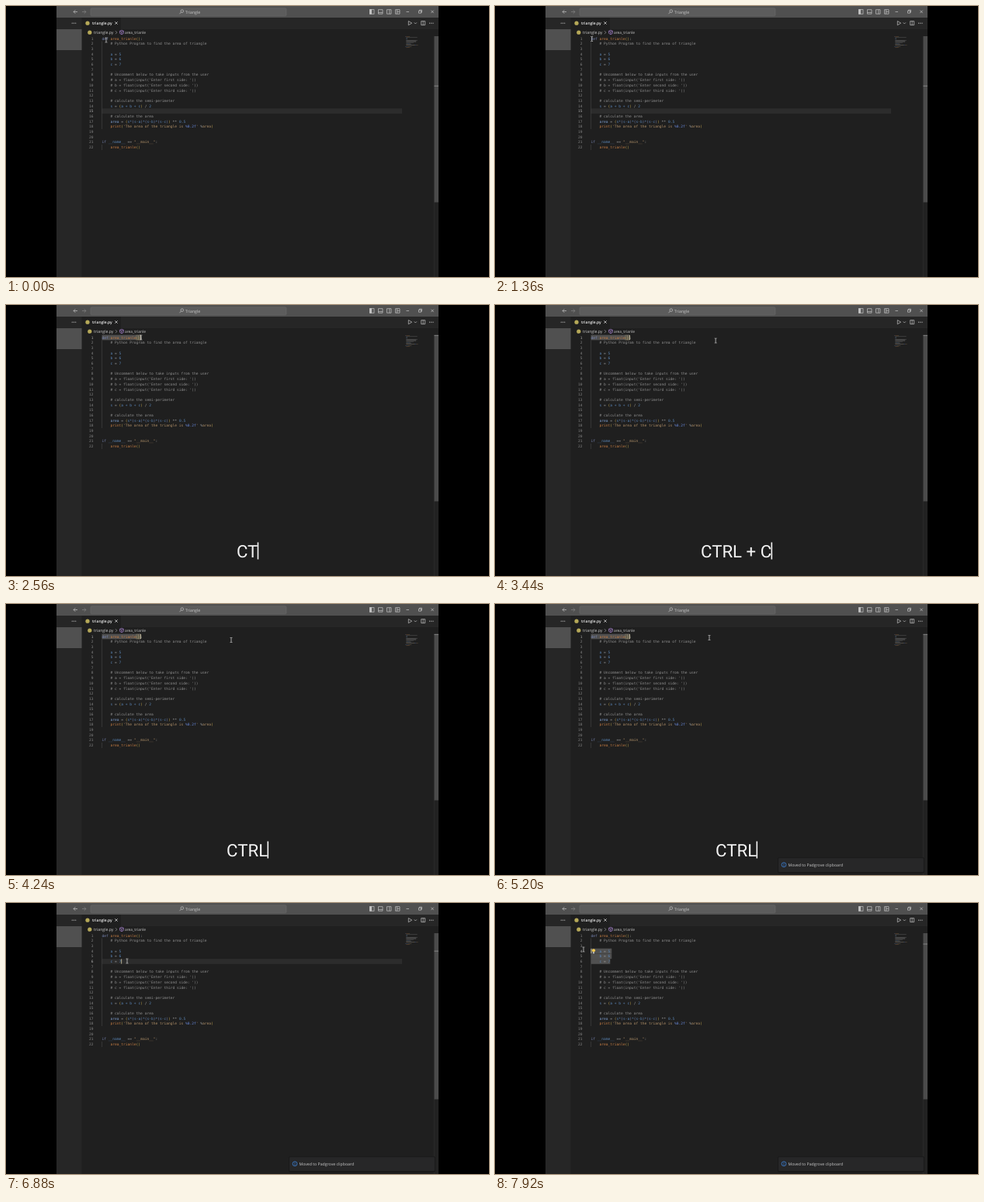
An HTML page for the animation above (8000 ms loop, 622 by 350 pixels).

```html
<!DOCTYPE html>
<html lang="en">
<head>
<meta charset="utf-8">
<title>Editor</title>
<style>
  html, body { margin: 0; width: 100%; height: 100%; overflow: hidden; background: #000; }
  svg { display: block; width: 622px; height: 350px; }
  text { white-space: pre; text-rendering: geometricPrecision; }
  .code { font: 4.585px "DejaVu Sans Mono", monospace; }
  .ui { font: 5.2px "Open Sans", "Noto Sans", sans-serif; fill: #c8c8c8; }
  .keys { font: 22.2px Roboto, sans-serif; fill: #f4f4f4; }
  .icon { fill: none; stroke: #c4c4c4; stroke-width: .7; }
</style>
</head>
<body>
<svg id="stage" viewBox="0 0 622 350">
  <rect width="622" height="350" fill="#000"/>
  <rect x="65" width="492" height="350" fill="#1f1f1f"/>
  <rect x="65" y="15" width="492" height="15" fill="#262626"/>
  <rect x="65" y="15" width="32.5" height="335" fill="#262626"/>
  <rect x="65" y="30" width="32.5" height="27" fill="#505050"/>
  <rect x="97.5" y="15" width="50.5" height="15" fill="#1f1f1f"/>
  <rect x="65" width="492" height="15" fill="#505050"/>
  <rect x="109" y="2.8" width="252" height="10" rx="1.5" fill="#5c5c5c" stroke="#6c6c6c" stroke-width=".5"/>

  <g class="icon">
    <path d="M92 7.5h-5m2.3-2.3l-2.3 2.3 2.3 2.3"/>
    <path d="M98 7.5h5m-2.3-2.3l2.3 2.3-2.3 2.3" stroke="#858585"/>
    <circle cx="226.8" cy="6.6" r="1.8"/><path d="M225.5 8l-2 2.2"/>
    <rect x="468.5" y="4.7" width="5.5" height="5.5"/>
    <path d="M468.5 4.7h2.3v5.5h-2.3z" fill="#c4c4c4"/>
    <path d="M479.5 4.7h5.5v5.5h-5.5zM479.5 8.4h5.5M490.5 4.7h5.5v5.5h-5.5zM493.8 4.7v5.5"/>
    <path d="M501.5 4.7h5.5v5.5h-5.5zM503.6 4.7v5.5M503.6 7.4h3.4"/>
    <path d="M515.5 7.5h3.5M531.5 6.2h3v3h-3zM532.5 6.2v-1h3v3h-1M547.4 5.7l3.4 3.4m0-3.4l-3.4 3.4"/>
    <path d="M518.3 19.5v5.2l4.4-2.6zM525.7 21.4l1.6 1.6 1.6-1.6M534.7 19.6h5v5h-5zM537.2 19.6v5"/>
    <path d="M140.3 20.3l3.4 3.4m0-3.4l-3.4 3.4" stroke="#e6e6e6"/>
    <path d="M141 32.2l1.8 2-1.8 2" stroke="#999"/>
    <path d="M149 31.2l2.4 1.2v2.9l-2.4 1.4-2.4-1.4v-2.9zM146.6 32.4l2.4 1.2 2.4-1.2M149 33.6v3.1" stroke="#a884cf"/>
  </g>
  <g id="dots" fill="#c4c4c4"></g>
  <circle cx="105" cy="22.2" r="2.6" fill="#b6a958"/>
  <circle cx="107.8" cy="34.2" r="2.6" fill="#b6a958"/>
  <g class="ui">
    <text x="231" y="9.5">Triangle</text>
    <text x="111" y="24.1" fill="#eee" style="fill:#f0f0f0;font-weight:600;font-size:5px">triangle.py</text>
    <text x="113" y="36">triangle.py</text>
    <text x="153" y="36" style="font-size:4.9px">area_trianle</text>
  </g>

  <rect x="551" y="39" width="6" height="311" fill="#222"/>
  <path d="M551.2 39v311" stroke="#303030" stroke-width=".6"/>
  <rect x="551.5" y="39" width="5.5" height="214.5" fill="#4b4b4b"/>
  <rect id="mark" x="551.5" width="5.5" height="1" fill="#858585"/>
  <rect id="band" x="123.5" width="386.5" height="6.7" fill="#2c2c2c"/>
  <g id="sel" fill="#505050"></g>
  <path d="M123.6 45.4V159M123.6 179V186" stroke="#494949" stroke-width=".6"/>
  <path id="pair" d="M167.7 39.1h2.7v6h-2.7zM170.4 39.1h2.7v6h-2.7z" fill="none" stroke="#8c8369" stroke-width=".5"/>
  <g id="map"></g>
  <g id="lines" class="code"></g>
  <rect id="caret" width=".8" height="6.2" fill="#ddd3b0"/>
  <g id="bulb">
    <circle cx="127" cy="61.3" r="2.1" fill="#f0c850"/>
    <path d="M126 63.6h2v1.6h-2z" fill="#c9ccd0"/>
  </g>
  <path id="mouse" d="M-1.4-3h1l.4.4.4-.4h1M0-2.6v5.2M-1.4 3h1l.4-.4.4.4h1" fill="none" stroke="#d6d6d6" stroke-width=".75"/>

  <g id="toast">
    <rect x="364" y="327.6" width="189" height="20" rx="1" fill="#191919"/>
    <rect x="365" y="328.3" width="187" height="17.7" rx=".8" fill="#272728"/>
    <circle cx="372" cy="336.8" r="2.9" fill="none" stroke="#3b82d8" stroke-width=".8"/>
    <path d="M372 336.3v2.1M372 334.8v.8" stroke="#3b82d8" stroke-width=".8"/>
    <text class="ui" x="377.5" y="338.8">Moved to Padgrove clipboard</text>
  </g>
  <text id="keys" class="keys" y="326"></text>
  <rect id="bar" y="306.5" width="1.6" height="22" fill="#f4f4f4"/>
</svg>
<script>
const $ = id => document.getElementById(id);
const NS = 'http://www.w3.org/2000/svg';
const X0 = 123.5, CHAR = 2.76, PITCH = 6.69;
const rowY = n => 42 + (n - 1) * PITCH;
const set = (node, attrs) => { for (const k in attrs) node.setAttribute(k, attrs[k]); return node; };
const add = (parent, tag, attrs, text) => {
  const node = set(document.createElementNS(NS, tag), attrs);
  if (text) node.textContent = text;
  return parent.appendChild(node);
};

const colors = { c: '#929292', b: '#5b86b8', k: '#7886b4', o: '#c47c43', y: '#c2a64e', s: '#b29169', n: '#7f9fd0', w: '#a6a6a6', f: '#6b8ce0' };
// Each part starts with its colour key.
const code = {
  1: ['kdef ', 'oarea_trianle', 'y()', 'w:'],
  2: ['c    # Python Program to find the area of triangle'],
  4: ['b    a ', 'w= ', 'b5'],
  5: ['b    b ', 'w= ', 'b6'],
  6: ['b    c ', 'w= ', 'b7'],
  8: ['c    # Uncomment below to take inputs from the user'],
  9: ["c    # a = float(input('Enter first side: '))"],
  10: ["c    # b = float(input('Enter second side: '))"],
  11: ["c    # c = float(input('Enter third side: '))"],
  13: ['c    # calculate the semi-perimeter'],
  14: ['b    s ', 'w= ', 'y(', 'ba + b + c', 'y)', 'w / ', 'b2'],
  16: ['c    # calculate the area'],
  17: ['n    area ', 'w= ', 'y(', 'bs*', 'k(', 'bs-a', 'k)', 'b*', 'k(', 'bs-b', 'k)', 'b*', 'k(', 'bs-c', 'k)', 'y)', 'w ** ', 'b0.5'],
  18: ['o    print', 'y(', "s'The area of the triangle is ", 'f%0.2f', "s' ", 'w%', 'sarea', 'y)'],
  21: ['kif ', 'b__name__ ', 'w== ', 's"__main__"', 'w:'],
  22: ['o    area_trianle', 'y()']
};

const nums = [];
for (let n = 1; n <= 22; n++) {
  const y = rowY(n) + 1.6;
  nums[n] = add($('lines'), 'text', { x: 112.6, y, 'text-anchor': 'end', fill: '#858585' }, String(n));
  if (!code[n]) continue;
  const row = add($('lines'), 'text', { x: X0, y });
  let col = 0;
  for (const part of code[n]) {
    add(row, 'tspan', { fill: colors[part[0]] }, part.slice(1));
    const indent = part.slice(1).search(/\S/);
    const len = part.length - 1 - indent;
    add($('map'), 'rect', { x: 514 + (col + indent) * .32, y: 38.9 + n * .65, width: len * .32, height: .4, fill: colors[part[0]], opacity: .6 });
    col += part.length - 1;
  }
}
for (const [x, y] of [[87.5, 22.2], [547.8, 22.2]])
  for (const d of [-2.2, 0, 2.2]) add($('dots'), 'circle', { cx: x + d, cy: y, r: .6 });

const selRows = [0, 1, 2].map(() => add($('sel'), 'rect', { height: PITCH }));

// time, x, y
const path = [
  [0, 129, 44], [80, 129, 44], [400, 126, 43], [560, 126, 43], [1120, 124.7, 42.5], [1440, 124.7, 42.5],
  [2000, 173, 42], [2640, 174, 42], [3360, 284, 46], [4160, 290, 46.5], [4480, 290, 46.5],
  [4960, 276, 43.5], [5280, 276, 43.5], [5760, 156, 75], [6960, 156, 75],
  [7600, 116, 61], [7760, 114, 60], [8000, 114, 60]
];
const ease = p => p * p * (3 - 2 * p);
function mouseAt(t) {
  const i = path.findIndex((p, k) => k && t <= p[0]);
  const [t0, x0, y0] = path[i - 1], [t1, x1, y1] = path[i];
  const p = ease((t - t0) / (t1 - t0));
  return [x0 + (x1 - x0) * p, y0 + (y1 - y0) * p];
}

// Selected column ranges as [row, from, to]
function selection(t, x) {
  if (t >= 1440 && t < 5840) {
    const end = Math.max(0, Math.min(18, Math.round((x - X0) / CHAR)));
    return [[1, 0, t < 2000 ? end : 18]];
  }
  if (t < 6960) return [];
  const p = ease(Math.min(1, (t - 6960) / 640));
  const top = 6 - Math.round(p * 2);
  const left = Math.round(9 * (1 - p));
  const rows = [];
  for (let n = top; n <= 6; n++) rows.push([n, n === top ? left : 0, n < 6 ? 9.7 : 9]);
  return rows;
}

const WORD = 'CTRL + C';
function typed(t) {
  const s = t - (t < 4160 ? 2560 : 4160);
  if (s < 0 || s >= 1280) return -1;
  if (s < 320) return 2 + s / 40;
  return s < 960 ? 8 : Math.max(0, 8 - (s - 880) / 40);
}

const show = (id, on) => set($(id), { visibility: on ? 'visible' : 'hidden' });
function draw(t) {
  const [x, y] = mouseAt(t);
  set($('mouse'), { transform: `translate(${x} ${y})` });

  const rows = selection(t, x);
  selRows.forEach((r, i) => {
    const [n, from, to] = rows[i] || [1, 0, 0];
    set(r, { x: X0 + from * CHAR, y: rowY(n) - 3.35, width: (to - from) * CHAR });
  });

  const line = t < 1440 ? 15 : t < 5840 ? 1 : rows.length ? rows[0][0] : 6;
  nums.forEach((node, n) => set(node, { fill: n === line ? '#adadad' : '#858585' }));
  set($('band'), { y: rowY(line) - 3.35 });
  show('band', !rows.length);
  set($('mark'), { y: 38.8 + (line - 1) * 4.57 });
  show('pair', t >= 2000 && t < 5840);

  const col = line === 15 ? 0 : line === 1 ? rows[0][2] : rows.length ? rows[0][1] : 9;
  set($('caret'), { x: X0 + col * CHAR, y: rowY(line) - 3.1 });
  const since = t < 2000 ? t + 500 : t < 5840 ? t - 2000 : t < 6960 ? t - 5840 : 0;
  show('caret', t >= 1440 && since % 1000 < 600);
  show('bulb', t >= 7760);

  const p = ease(Math.max(0, Math.min(1, (t - 4640) / 320)));
  set($('toast'), { opacity: p, transform: `translate(0 ${(1 - p) * 12})` });

  const count = typed(t);
  show('keys', count > 0);
  show('bar', count >= 0);
  if (count >= 0) {
    $('keys').textContent = WORD.slice(0, count);
    const w = count ? $('keys').getComputedTextLength() : 0;
    set($('keys'), { x: 310.6 - w / 2 });
    set($('bar'), { x: 310.6 + w / 2 - .6 });
  }
}

const start = performance.now();
function tick() {
  const t = (performance.now() - start) % 8000;
  draw(Math.floor(t / 80) * 80);
  requestAnimationFrame(tick);
}
draw(0);
requestAnimationFrame(tick);
</script>
</body>
</html>
```
